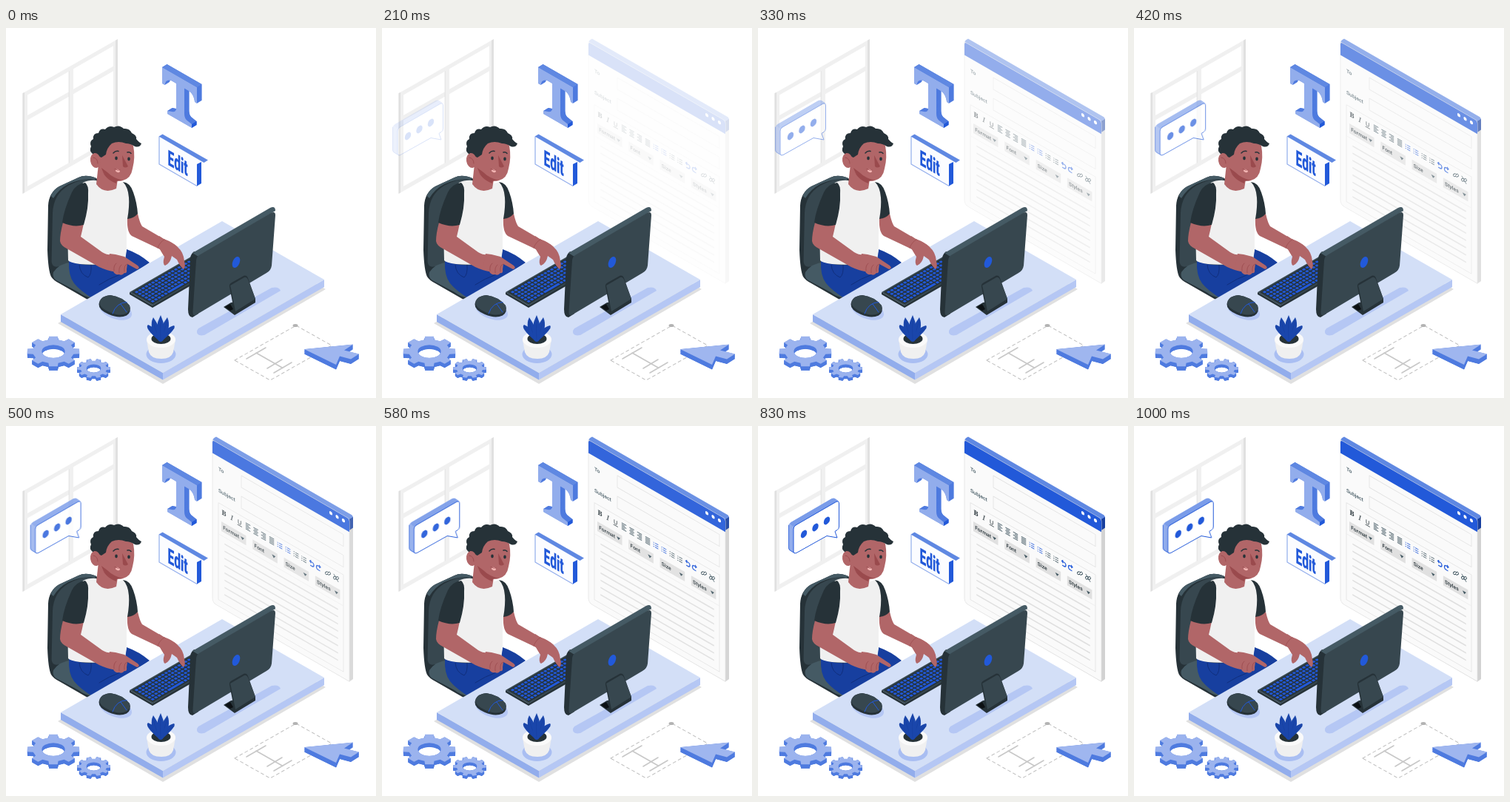
Recreate the animation shown at these times as an HTML page with a canvas. Size 500 px wide and 500 px high, loop 1.04 s.

```html
<!DOCTYPE html>
<html lang="en">
<head>
<meta charset="utf-8">
<title>Text editing</title>
<style>
html, body { margin: 0; width: 100%; height: 100%; overflow: hidden; background: #fff; }
canvas { display: block; width: 500px; height: 500px; }
</style>
</head>
<body>
<canvas id="stage"></canvas>
<script>
const SIZE = 500, LOOP = 1040, SLOPE = 0.577;
const ratio = window.devicePixelRatio || 1;
const BLUE = '#2259d9', MID = '#4f7bdf', EDGE = '#5f88e2', LIGHT = '#92adec', PALE = '#b5c7f4', DESK = '#d3dff7';
const NAVY = '#173f9f', DARK = '#263238', SLATE = '#37474f', STEEL = '#455a64';
const SKIN = '#b16668', SHADE = '#9a4a4d', GREY = '#e0e0e0', SOFT = '#f0f0f0';

let g;

function setup(canvas) {
  canvas.width = canvas.height = SIZE * ratio;
  const c = canvas.getContext('2d');
  c.scale(ratio, ratio);
  return c;
}

function layer(draw) {
  const canvas = document.createElement('canvas');
  g = setup(canvas);
  draw();
  return canvas;
}

function fill(d, color) {
  g.fillStyle = color;
  g.fill(d instanceof Path2D ? d : new Path2D(d), 'evenodd');
}

function line(d, color, w = 1) {
  g.strokeStyle = color;
  g.lineWidth = w;
  g.lineCap = g.lineJoin = 'round';
  g.stroke(new Path2D(d));
}

function oval(x, y, rx, ry, color, turn = 0) {
  g.fillStyle = color;
  g.beginPath();
  g.ellipse(x, y, rx, ry, turn, 0, 7);
  g.fill();
}

function inSpace(matrix, draw) {
  g.save();
  g.transform(...matrix);
  draw();
  g.restore();
}

function text(str, x, y, font, color) {
  g.font = font;
  g.fillStyle = color;
  g.fillText(str, x, y);
}

// Solid body: the face swept along (dx, dy), with the face on top.
function solid(d, dx, dy, side, face) {
  const path = new Path2D(d), n = 24;
  for (let i = n; i > 0; i--) {
    inSpace([1, 0, 0, 1, dx * i / n, dy * i / n], () => fill(path, side));
  }
  fill(path, face);
}

function wallWindow() {
  const top = x => 88.3 - 0.571 * (x - 22.5);
  const slab = (x0, x1, a, b, color) => fill(
    `M${x0} ${top(x0) + a}L${x1} ${top(x1) + a}V${top(x1) + b}L${x0} ${top(x0) + b}Z`, color);
  slab(22.5, 151, 0, 135.7, SOFT);
  slab(22.5, 25, 0, 135.7, GREY);
  slab(84.5, 86, 6, 130, '#e6e6e6');
  slab(148, 151, 0, 135.7, GREY);
  for (const [a, b] of [[29, 84.5], [91, 145]]) {
    slab(a, b, 6, 33.5, '#fff');
    slab(a, b, 40, 129.5, '#fff');
  }
}

function letterT() {
  solid('M211 53L258 80V102L255 100Q254 90 247 85L241 81.5V116Q241 123 246 126L251 130V135L218 116V112L224 113Q230 114 230 109V75L224 71.5Q216 68 214.5 77L211 75Z',
    6.5, -4, MID, LIGHT);
  fill('M211 53L217.5 49L264.5 76L258 80Z', EDGE);
  fill('M251 135V130L257.5 126V131Z', BLUE);
}

function editBox() {
  fill('M207 147L266 181L258 184V213.5L207 184Z', '#fbfcff');
  line('M258 213.5L207 184V147', LIGHT, 1.2);
  fill('M258 184L264 181V210L258 213.5Z', BLUE);
  fill('M206.5 146.5L211.5 143.5L273 178.5L267.5 182Z', EDGE);
  inSpace([0.54, 0.312, 0, 1, 218.6, 184.8], () =>
    text('Edit', 0, 0, '900 29px Roboto, "Liberation Sans", sans-serif', BLUE));
}

function gear(cx, cy, rx, ry, depth, teeth) {
  let d = '';
  for (let i = 0; i < teeth; i++) {
    for (const [a, r] of [[-0.3, 0.79], [-0.21, 1], [0.21, 1], [0.3, 0.79]]) {
      const w = (i + a) / teeth * Math.PI * 2;
      d += `${d ? 'L' : 'M'}${cx + rx * r * Math.cos(w)} ${cy + ry * r * Math.sin(w)}`;
    }
  }
  const hx = rx * 0.44, hy = ry * 0.43;
  d += `ZM${cx - hx} ${cy}a${hx} ${hy} 0 1 0 ${2 * hx} 0a${hx} ${hy} 0 1 0 ${-2 * hx} 0Z`;
  solid(d, 0, depth, MID, '#9bb3ee');
}

function chair() {
  fill('M122 203Q108 197 98 202L72 214Q58 222 57 240L56 300Q57 328 61 336Q64 341 72 345L112 368L165 345L150 230Z', DARK);
  fill('M122 203Q108 197 98 202L72 214Q64 218 60.5 227L64 230Q71 218 84 211Q104 202 120 205Z', STEEL);
  fill('M120 205Q105 202 84 213Q64 225 63 250L61.5 316Q63 325 72 322L110 345L150 250Z', SLATE);
  fill('M64 330Q72 318 90 316L140 345L118 364Q108 365 98 357L68 341Q62 337 64 330Z', STEEL);
}

function body() {
  fill('M85 314Q100 322 125 320L160 314L163 299Q180 305 194 317L150 346L118 366Q100 355 92 345Q84 335 85 314Z', NAVY);
  line('M99 320Q100 333 111 337Q116 333 115 320M126 347Q140 338 152 334', '#102d78', 0.9);
  fill('M104 209Q112 205 122 206Q134 218 149 211L158 208Q169 212 171 230L163 262V300L161 314Q130 322 100 319Q86 317 84 314L83 270Q95 230 104 209Z', SOFT);
  fill('M125 184L122 211Q132 225 149 217L151 205L140 188Z', SKIN);
  fill('M129 188Q131 203 149 210L150 206L140 190Z', SHADE);
  fill('M164 257L178 251Q181 264 184 268L213 285Q226 290 232 296Q240 303 241 315Q243 323 240 326Q235 322 231 313L224 308Q222 318 215 321Q211 319 214 309L208 299L170 281Q163 276 164 257Z', SKIN);
  fill('M158 208Q168 209 172 222Q177 236 178 251Q173 257 164 258Q167 241 166 229Q165 215 158 208Z', DARK);
  fill('M77 263Q73 278 73 288Q74 294 82 298L126 323Q137 328 145 329L148 306Q138 308 130 303L101 282Q103 274 105 264Z', SKIN);
  fill('M107 209Q94 211 89 222Q78 246 76 263Q92 270 105 266Q112 242 111 224Q112 213 107 209Z', DARK);
}

function head() {
  fill('M136 156Q150 151 166 154L172 159Q175 175 171 190Q169 203 158 206Q148 208 139 203L126 190L124 168Z', SKIN);
  fill('M129 189Q133 203 148 207L158 206Q145 203 137 195Z', SHADE);
  fill('M117 170Q112 166 115 160Q112 153 118 150Q117 142 125 142Q127 135 134 137Q139 131 146 134Q153 130 159 136Q167 135 170 142Q177 145 176 150Q180 155 183 156Q181 162 174 160Q168 156 162 156Q152 152 143 156Q136 162 135 171L129 175Z', DARK);
  oval(121, 179, 7, 10, SKIN, -0.15);
  line('M118 175Q124 176 124 183', SHADE, 0.9);
  fill('M157 172L158 187Q161 190 165 187Z', SHADE);
  oval(149, 176, 1.8, 2.4, DARK);
  oval(166, 177, 1.8, 2.4, DARK);
  line('M145 169Q148 165.5 152 166.5M164 168Q167 167 169 169.5', DARK, 1.5);
  oval(151, 193, 3, 2, '#f3b5b3', 0.3);
  line('M147 190.5Q151 193 154 192', SHADE, 0.8);
}

function desk() {
  fill('M70 399L292 271L432 353L212 481Z', GREY);
  fill('M74 387L212 466V475.5L74 397Z', LIGHT);
  fill('M212 466L430 340V350L212 475.5Z', PALE);
  fill('M74 387L292 261L430 340L212 466Z', DESK);
  fill('M260 406L359 351Q369 349 371 355L268 415Q257 417 258 409Z', PALE);
}

function keyboard() {
  const iso = [0.866, -0.5, 0.866, 0.5, 167, 357];
  fill('M167 357V360L198 378L262 341V337L198 375Z', DARK);
  inSpace(iso, () => {
    g.fillStyle = SLATE;
    g.fillRect(0, 0, 106, 36);
    g.fillStyle = DARK;
    g.fillRect(2, 2, 104, 32);
    g.fillStyle = BLUE;
    for (let r = 0; r < 6; r++) {
      for (let c = 0; c < 20; c++) {
        if (r === 5 && c > 4 && c < 10) continue;
        g.fillRect(4 + c * 5.1, 3.6 + r * 5, 3.6, 3.4);
      }
    }
    g.fillRect(29.5, 28.6, 24, 3.4);
  });
}

function mouse() {
  oval(148, 381, 23, 12, PALE, 0.35);
  fill('M125.5 373Q127 362 141 361Q157 363 167 375Q170 384 163 388.5Q153 393 139 387Q125 381 125.5 373Z', DARK);
  fill('M126 371.5Q129 362 141 361Q157 363 167 375Q169 381 163 385.5Q153 390 140 384Q127 378.5 126 371.5Z', SLATE);
  line('M144 386Q149 371 163 370.5M155 373L163 384', BLUE, 1);
}

function plant() {
  oval(209.5, 441, 20, 12, '#a9bef2');
  fill('M190 421L193 438Q196 447 210 447Q223 447 226 438L229 421Z', SOFT);
  oval(209.5, 421, 19.5, 11, '#fafafa');
  oval(209.5, 420, 13, 7, DARK);
  for (const [x, y] of [[192, 401], [199, 391], [227, 402], [218, 391], [209, 388]]) {
    const dx = (x - 209) * 0.8;
    fill(`M206 422Q${200 + dx} 405 ${x} ${y}Q${217 + dx} 405 212 422Q209 425 206 422Z`, '#1a46ab');
    line(`M209 421Q${208 + dx} 407 ${x} ${y + 4}`, NAVY, 0.7);
  }
}

function monitor() {
  fill('M294 377L304 371L337 366V371L309 388Z', DARK);
  fill('M296 377L303 373L307 380L303 382Z', '#0c1114');
  fill('M254 302Q248 307 249 315L246 380Q246 391 252 391L260 386L264 306Z', DARK);
  fill('M252 304L357 243Q364 240 364 247L260 309Z', STEEL);
  fill('M261 307L358 250Q364 247 364 253L359 321Q358 328 352 331L258 387Q252 391 252.5 383L257 314Q257.5 309 261 307Z', SLATE);
  oval(311, 316.5, 4.7, 8, BLUE, 0.4);
  fill('M302 350Q301 346 305 344L322 334.5Q326 334 327 338L337 366L309 385Z', DARK);
  fill('M303 348L322 337Q325 336 327 340L337 366L310 383L304 352Z', SLATE);
}

function sketch() {
  g.setLineDash([4, 4]);
  line('M309 449L392 402L440 429L357 476Z', '#c4c4c4', 1.1);
  g.setLineDash([]);
  oval(391, 402, 3.5, 2, '#b3b3b3');
  line('M325 447L351 432M338 439L374 459.5M353 460L373 448M362 466L386 452', '#c8c8c8', 1.6);
  solid('M403 434L469 427.5L457 435.5L477 440.5L466 447.5L451 443.5L446 455Z', 0, 6.5, MID, '#9fb6ef');
}

function panelIcons() {
  const ink = STEEL, y = 90;
  const font = 'px "Noto Serif", "Liberation Serif", serif';
  text('B', 12.5, y + 3, 'bold 9' + font, DARK);
  text('I', 24.5, y + 3, 'italic 9' + font, DARK);
  text('U', 34, y + 3, '8px Roboto, sans-serif', DARK);
  line(`M34 ${y + 4.5}h5.5`, DARK, 0.7);
  [48, 58.5, 69, 80].forEach((x, k) => {
    for (let i = 0; i < 5; i++) {
      const w = i % 2 && k < 3 ? 3.6 : 5.6;
      const left = k === 0 ? x - 2.8 : k === 1 ? x - w / 2 : x + 2.8 - w;
      line(`M${left} ${y - 4 + i * 2}h${w}`, ink, 1);
    }
  });
  [91, 102, 113, 123.5].forEach((x, k) => {
    const color = k < 2 ? BLUE : ink;
    for (let i = -1; i < 2; i++) {
      line(`M${x - 3} ${y + i * 2.7}h.5M${x - 0.7} ${y + i * 2.7}h3.7`, color, 0.9);
    }
  });
  line(`M132 ${y - 2.5}h2.5a2.5 2.7 0 0 1 0 5.4h-2M133 ${y - 4}l-1.5 1.5l1.5 1.5`, BLUE, 1.3);
  line(`M145.5 ${y - 2.5}h-2.5a2.5 2.7 0 0 0 0 5.4h2M144.5 ${y - 4}l1.5 1.5l-1.5 1.5`, BLUE, 1.3);
  for (const x of [156, 167]) {
    line(`M${x - 0.5} ${y + 1.5}l-1.5 1.5q-2 0 -1.5 -2l2 -2.4q1.5 -.8 2 .6M${x + 0.5} ${y - 1.5}l1.5 -1.5q2 0 1.5 2l-2 2.4q-1.5 .8 -2 -.6`, ink, 0.9);
  }
  line('M164 86.5l6 7', ink, 0.7);
}

function panel() {
  fill('M464 126L469 123V342L464 345.5Z', '#d2d2d2');
  fill('M279 19.5Q280 16 284 14.5L466 119.5Q469 121 469 124L464 127Z', EDGE);
  fill('M464 126L469 123V137.5L464 141Z', '#173f9f');
  inSpace([1, SLOPE, 0, 1, 279, 19], () => {
    const face = 'M0 0H182Q185 0 185 3V219.5H5Q0 219 0 214Z';
    fill(face, '#fafafa');
    line(face, GREY, 0.8);
    fill('M0 3Q0 0 3 0H182Q185 0 185 3V17.5H0Z', BLUE);
    for (const x of [160, 168.5, 177]) oval(x, 6.5, 2.1, 2.3, '#fff');
    const font = '500 6.8px Roboto, "Liberation Sans", sans-serif';
    text('To', 8, 36.3, font, STEEL);
    text('Subject', 8, 65.5, font, STEEL);
    line('M39 25.5H177V41.5H39ZM39 53.5H177V69.5H39ZM8 80H177V211H8Z', GREY, 0.8);
    line('M8 122H177', '#ececec', 0.7);
    panelIcons();
    ['Format', 'Font', 'Size', 'Styles'].forEach((name, i) => {
      const x = 12 + i * 42.3;
      g.fillStyle = GREY;
      g.fillRect(x, 103, 33.5, 13);
      text(name, x + 2.2, 112, font, DARK);
      fill(`M${x + 26} 108h5l-2.5 3.6Z`, STEEL);
    });
    for (let i = 0; i < 8; i++) line(`M17 ${131 + i * 9.8}H169`, GREY, 1.8);
  });
}

function bubble() {
  const face = 'M51 134L105.5 102.5Q109.5 100.5 109.5 105V136Q109.5 139 107 140.5L104 142.5L107 151L93 148.5L52 171.5Q48 173 48 169V139Q48 136 51 134Z';
  solid(face, -6.5, -4, LIGHT, '#fff');
  // lit upper side of the body
  fill('M43 132L45 130L99 98.5Q102 97 104 98L109 101.5L105.5 102.5L51 134L48.5 136.5Z', '#7a9ce9');
  line(face, BLUE, 1);
  line('M41.5 134V165Q41.5 167 44 168.5L49 171.5', BLUE, 0.8);
  for (const [x, y] of [[62, 146], [77.5, 137], [93, 128]]) {
    inSpace([0.866, -0.5, 0, 1, x, y], () => oval(0, 0, 4.8, 4.8, BLUE));
  }
}

// The resting hands lie over the desk.
function hands() {
  fill('M140 305L148 306L160 309L178 321Q182 325 177 326L164 319L163 326Q164 332 160 331Q157 335 153 333Q147 334 145 329L136 326Z', SKIN);
  line('M146 328Q145 321 149 318M153 331Q152 323 156 320M160 329Q159 320 164 319', SHADE, 0.8);
  fill('M207 281L213 285Q226 290 232 296Q240 303 241 315Q243 323 240 326Q235 322 231 313L224 308Q222 318 215 321Q211 319 214 309L208 299L200 294Z', SKIN);
  line('M205 297Q208 289 214 286', SHADE, 0.7);
}

// Monotone curve through [time, value] pairs.
function curve(keys, t) {
  let i = 0;
  while (i < keys.length - 2 && t > keys[i + 1][0]) i++;
  const rate = k => (keys[k + 1][1] - keys[k][1]) / (keys[k + 1][0] - keys[k][0]);
  const slope = k => {
    if (k === 0 || k === keys.length - 1) return 0;
    const a = rate(k - 1), b = rate(k);
    return a * b <= 0 ? 0 : 2 * a * b / (a + b);
  };
  const [t0, v0] = keys[i], [t1, v1] = keys[i + 1];
  const h = t1 - t0, s = (t - t0) / h, q = 1 - s;
  return v0 * (1 + 2 * s) * q * q + slope(i) * h * s * q * q
    + v1 * s * s * (3 - 2 * s) - slope(i + 1) * h * s * s * q;
}

const FADE = [[0, 0], [210, 0.17], [330, 0.48], [500, 0.81], [670, 0.99], [760, 1], [1040, 1]];
const SLIDE = [[0, -30], [210, -27], [330, -18.3], [500, -8.4], [670, -2], [830, 0], [1000, -2.3], [1040, -3]];

const backdrop = layer(wallWindow);
const panelLayer = layer(panel);
const bubbleLayer = layer(bubble);
const scene = layer(() => {
  letterT();
  editBox();
  chair();
  body();
  head();
  desk();
  keyboard();
  mouse();
  hands();
  monitor();
  plant();
  gear(64, 437, 35.5, 20.5, 5.5, 8);
  gear(118.5, 460, 22.5, 13, 4, 10);
  sketch();
});

const stage = setup(document.getElementById('stage'));

function put(image, x = 0) {
  stage.drawImage(image, x, 0, SIZE, SIZE);
}

function draw(now) {
  // 24 steps per second, on a 10 ms clock
  const clock = Math.floor((now % LOOP) / 10) * 10;
  const t = Math.floor((clock + 9.99) * 0.024) / 0.024;
  stage.globalAlpha = 1;
  stage.fillStyle = '#fff';
  stage.fillRect(0, 0, SIZE, SIZE);
  put(backdrop);
  stage.globalAlpha = Math.min(1, Math.max(0, curve(FADE, t)));
  put(panelLayer);
  put(bubbleLayer, curve(SLIDE, t));
  stage.globalAlpha = 1;
  put(scene);
}

const start = performance.now();
function tick() {
  draw(performance.now() - start);
  requestAnimationFrame(tick);
}
tick();
</script>
</body>
</html>
```
